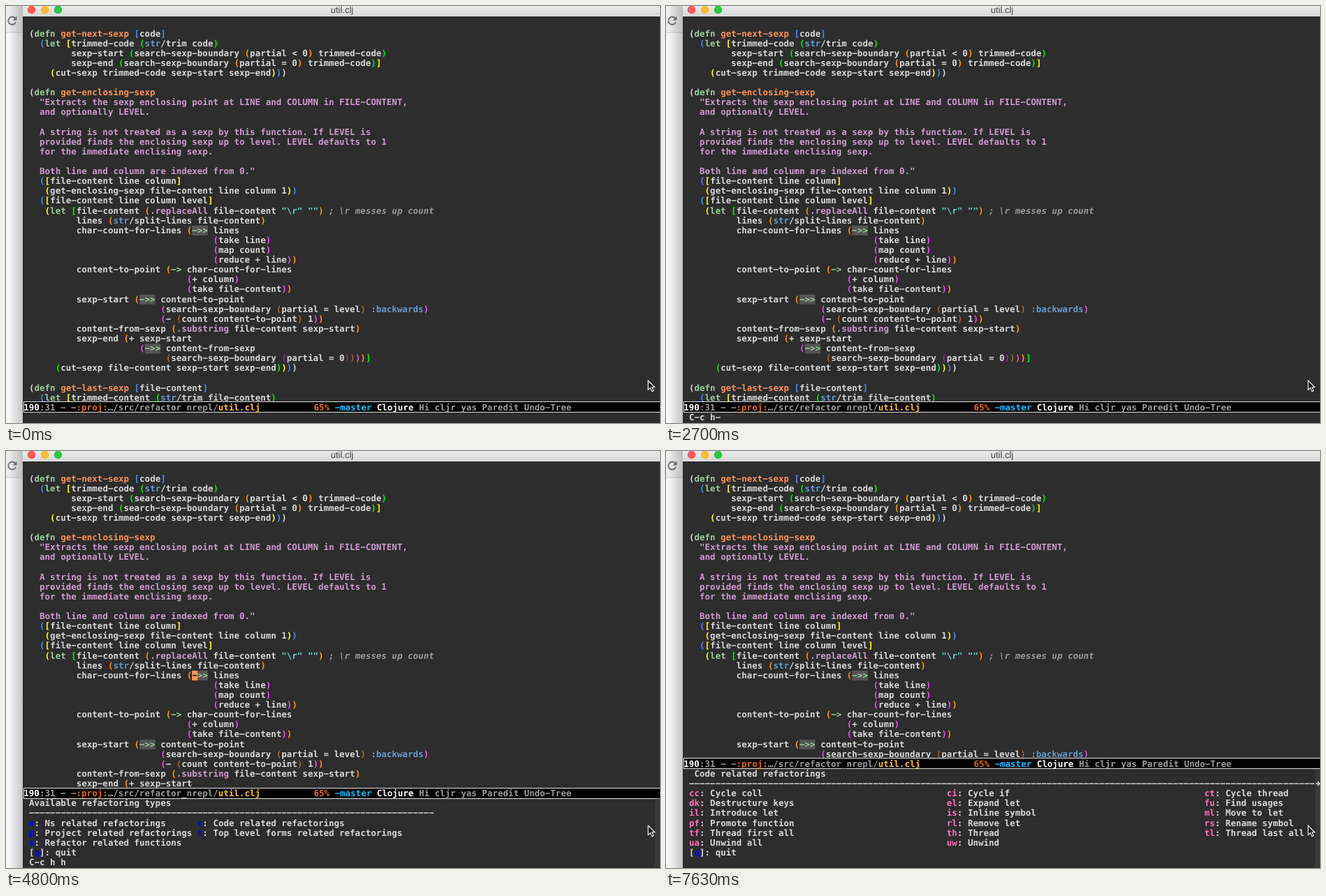
An HTML page that plays this animation: 936 by 598 pixels, repeating every 8 s.

```html
<!DOCTYPE html>
<html lang="en">
<head>
<meta charset="utf-8">
<title>util.clj</title>
<style>
html, body { margin: 0; width: 100%; height: 100%; overflow: hidden; background: #2d2d2d; }
svg { display: block; width: 936px; height: 598px; }
text {
  font: bold 12.5px "DejaVu Sans Mono", monospace;
  fill: #d6d6d6; white-space: pre; text-rendering: geometricPrecision;
}
.title { font: 13px "Liberation Sans", sans-serif; fill: #444; text-anchor: middle; }
.bg { fill: #2d2d2d; }

.keyword { fill: #99cc99; }
.name { fill: #f99157; }
.doc, .method { fill: #cc99cc; }
.string { fill: #66cccc; }
.type { fill: #6699cc; }
.comment { fill: #999; font-style: italic; }
.d2 { fill: #4f86f7; }
.d3 { fill: #ffff00; }
.d4 { fill: #00f000; }
.d5 { fill: #ff9410; }
.d6 { fill: #f545f5; }
.d7 { fill: #a0622d; }
.d8 { fill: #8b2f8b; }

.white { fill: #fff; }
.gray { fill: #999; }
.orange { fill: #dd6a10; }
.gold { fill: #ffc125; }
.sky { fill: #10bfff; }
.key1 { fill: #0000ff; }
.key2 { fill: #ff6eb4; }

.anim { opacity: 0; animation: 8s step-end infinite; }
#cursor { animation-name: blink; }
#prefix { animation-name: prefix; }
#chord { animation-name: chord; }
#dash { animation-name: dash; }
#types { animation-name: types; }
#commands { animation-name: commands; }
@keyframes blink {
  0%, 9.375%, 22.5%, 33.75%, 52.5%, 65.625%, 84.25%, 95.375%, 100% { opacity: 0; }
  3.75%, 15%, 28.125%, 41.25%, 60%, 71.25%, 89.875% { opacity: 1; }
}
@keyframes prefix { 0%, 22.5%, 100% { opacity: 0; } 15% { opacity: 1; } }
@keyframes chord { 0%, 46.875%, 100% { opacity: 0; } 22.5% { opacity: 1; } }
@keyframes dash { 0%, 46.875%, 100% { opacity: 0; } 24.375% { opacity: 1; } }
@keyframes types { 0%, 76.75%, 100% { opacity: 0; } 46.875% { opacity: 1; } }
@keyframes commands { 0% { opacity: 0; } 76.75%, 100% { opacity: 1; } }
</style>
</head>
<body>
<svg viewBox="0 0 936 598">
  <defs>
    <linearGradient id="bar" x2="0" y2="1">
      <stop stop-color="#eaeaea"/><stop offset="1" stop-color="#d8d8d8"/>
    </linearGradient>
    <linearGradient id="shade">
      <stop stop-color="#000" stop-opacity="0"/><stop offset="1" stop-color="#000" stop-opacity=".2"/>
    </linearGradient>
  </defs>

  <rect width="24" height="598" fill="#f6f6f6"/>
  <rect width="24" height="38" fill="#ececec"/>
  <rect y="37.5" width="24" height="1" fill="#cfcfcf"/>
  <path d="M13 17.5A5.5 5.5 0 1 0 14 23" fill="none" stroke="#777" stroke-width="2"/>
  <path d="M15.5 14.5V20.5H9.5Z" fill="#777"/>
  <rect x="4" width="20" height="598" fill="url(#shade)"/>

  <rect class="bg" x="24" width="912" height="598"/>
  <rect x="24" width="912" height="15" fill="url(#bar)"/>
  <circle cx="36.5" cy="5.5" r="5.8" fill="#fc5b57"/>
  <circle cx="55.5" cy="5.5" r="5.8" fill="#fdbc2e"/>
  <circle cx="74.5" cy="5.5" r="5.8" fill="#28c840"/>
  <text class="title" x="481" y="10">util.clj</text>

  <g id="code"></g>
  <g id="cursor" class="anim">
    <rect x="266" y="315" width="8" height="14" fill="#f99157"/>
    <path d="M267 321.8h6" stroke="#2d2d2d" stroke-width="1.6"/>
  </g>
  <g id="status"></g>
  <g id="prefix" class="anim"></g>
  <g id="chord" class="anim"></g>
  <g id="dash" class="anim"></g>
  <g id="types" class="anim"></g>
  <g id="commands" class="anim"></g>

  <path d="M919 537V550.5L922.2 547.6L924.6 552.8L926.8 551.8L924.5 546.8H928.5Z"
    fill="#111" stroke="#fff" stroke-width="1.1"/>
</svg>

<script>
const LEFT = 33, COL = 7.526, ROW = 14.115, BASE = 43.5;

const source = String.raw`(defn get-next-sexp [code]
  (let [trimmed-code (str/trim code)
        sexp-start (search-sexp-boundary (partial < 0) trimmed-code)
        sexp-end (search-sexp-boundary (partial = 0) trimmed-code)]
    (cut-sexp trimmed-code sexp-start sexp-end)))

(defn get-enclosing-sexp
  "Extracts the sexp enclosing point at LINE and COLUMN in FILE-CONTENT,
  and optionally LEVEL.

  A string is not treated as a sexp by this function. If LEVEL is
  provided finds the enclosing sexp up to level. LEVEL defaults to 1
  for the immediate enclising sexp.

  Both line and column are indexed from 0."
  ([file-content line column]
   (get-enclosing-sexp file-content line column 1))
  ([file-content line column level]
   (let [file-content (.replaceAll file-content "\r" "") ; \r messes up count
         lines (str/split-lines file-content)
         char-count-for-lines (->> lines
                                   (take line)
                                   (map count)
                                   (reduce + line))
         content-to-point (-> char-count-for-lines
                              (+ column)
                              (take file-content))
         sexp-start (->> content-to-point
                         (search-sexp-boundary (partial = level) :backwards)
                         (- (count content-to-point) 1))
         content-from-sexp (.substring file-content sexp-start)
         sexp-end (+ sexp-start
                     (->> content-from-sexp
                          (search-sexp-boundary (partial = 0))))]
     (cut-sexp file-content sexp-start sexp-end))))

(defn get-last-sexp [file-content]
  (let [trimmed-content (str/trim file-content)`;

const typesMenu = `Available refactoring types
${'-'.repeat(77)}
n: Ns related refactorings      c: Code related refactorings
p: Project related refactorings t: Top level forms related refactorings
s: Refactor related functions
[q]: quit
C-c h h`;

const commandRows = [
  ['cc: Cycle coll', 'ci: Cycle if', 'ct: Cycle thread'],
  ['dk: Destructure keys', 'el: Expand let', 'fu: Find usages'],
  ['il: Introduce let', 'is: Inline symbol', 'ml: Move to let'],
  ['pf: Promote function', 'rl: Remove let', 'rs: Rename symbol'],
  ['tf: Thread first all', 'th: Thread', 'tl: Thread last all'],
  ['ua: Unwind all', 'uw: Unwind'],
];
const commandsMenu = [
  ' Code related refactorings',
  '-'.repeat(119),
  ...commandRows.map(row => row.map(cell => cell.padEnd(49)).join('').trimEnd()),
  '[q]: quit',
].join('\n');

const put = (id, markup) => { document.getElementById(id).innerHTML = markup; };

// Minus signs give the wide dashes of the editor font.
const escape = s => s.replace(/&/g, '&amp;').replace(/</g, '&lt;').replace(/>/g, '&gt;')
  .replace(/ /g, '\u00a0').replace(/-/g, '\u2212');

const span = (s, cls) => s.split('\n')
  .map(part => cls && part ? `<tspan class="${cls}">${escape(part)}</tspan>` : escape(part))
  .join('\n');

const textAt = (x, row, markup) => `<text x="${x}" y="${BASE + row * ROW}">${markup}</text>`;

const textRows = (markup, firstRow) => markup.split('\n')
  .map((line, i) => line && textAt(LEFT, firstRow + i, line)).join('');

function highlight(code) {
  let depth = 0, previous = '';
  const tokens = /"(?:\\.|[^"\\])*"|;.*|[()[\]]|\s+|[^\s()[\]"]+/g;
  return code.replace(tokens, token => {
    if (/^\s/.test(token)) return span(token);
    const last = previous;
    previous = token;
    if (/^[([]/.test(token)) return span(token, 'd' + ++depth);
    if (/^[)\]]/.test(token)) return span(token, 'd' + depth--);
    if (token[0] === '"') return span(token, token.includes('\n') ? 'doc' : 'string');
    if (token[0] === ';') return span(token, 'comment');
    if (token[0] === '.') return span(token, 'method');
    if (token[0] === ':') return span(token, 'type');
    if (/^(defn|let|->>?)$/.test(token)) return span(token, 'keyword');
    if (last === 'defn') return span(token, 'name');
    if (token.startsWith('str/')) return span('str', 'type') + span(token.slice(3));
    return span(token);
  });
}

function arrowBoxes(code) {
  return code.split('\n').map((line, row) => {
    const col = line.indexOf('->>');
    return col < 0 ? '' : `<rect x="${LEFT + col * COL}" y="${32.7 + row * ROW}"
      width="${3 * COL}" height="14" fill="#545454"/>`;
  }).join('');
}

function statusBar(row) {
  const top = Math.round(31 + row * ROW) + 0.5;
  const left = [['190', 'white'], [':31 - -', 'gray'], [':proj:', 'orange'],
    ['…/src/refactor_nrepl/', 'gray'], ['util.clj', 'gold']];
  const right = [['65% ', 'orange'], ['-master ', 'sky'], ['Clojure ', 'white'],
    ['Hi cljr yas Paredit Undo-Tree', 'gray']];
  const join = parts => parts.map(part => span(...part)).join('');
  return `<rect class="bg" x="24" y="${top}" width="912" height="${598 - top}"/>
    <rect x="25.5" y="${top}" width="912" height="15" fill="#000" stroke="#e0e0e0"/>`
    + textAt(25.3, row, join(left)) + textAt(440.4, row, join(right));
}

function menu(content, statusRow) {
  const top = 47 + statusRow * ROW;
  const markup = span(content).replace(/\w+(?=\]?:)/g,
    key => `<tspan class="key${key.length}">${key}</tspan>`);
  return statusBar(statusRow)
    + `<rect x="929" y="${top}" width="7" height="${597 - top}" fill="#383838"/>`
    + textRows(markup, statusRow + 1);
}

put('code', arrowBoxes(source) + textRows(highlight(source), 0));
put('status', statusBar(38));
put('prefix', textAt(LEFT, 39, span('C-c-')));
put('chord', textAt(LEFT, 39, span('C-c h')));
put('dash', textAt(LEFT + 5 * COL, 39, span('-')));
put('types', menu(typesMenu, 32));
put('commands', menu(commandsMenu, 29)
  + '<path d="M930 477h5.5M932.5 474l3 3l-3 3" fill="none" stroke="#d6d6d6" stroke-width="1.4"/>');
</script>
</body>
</html>
```
